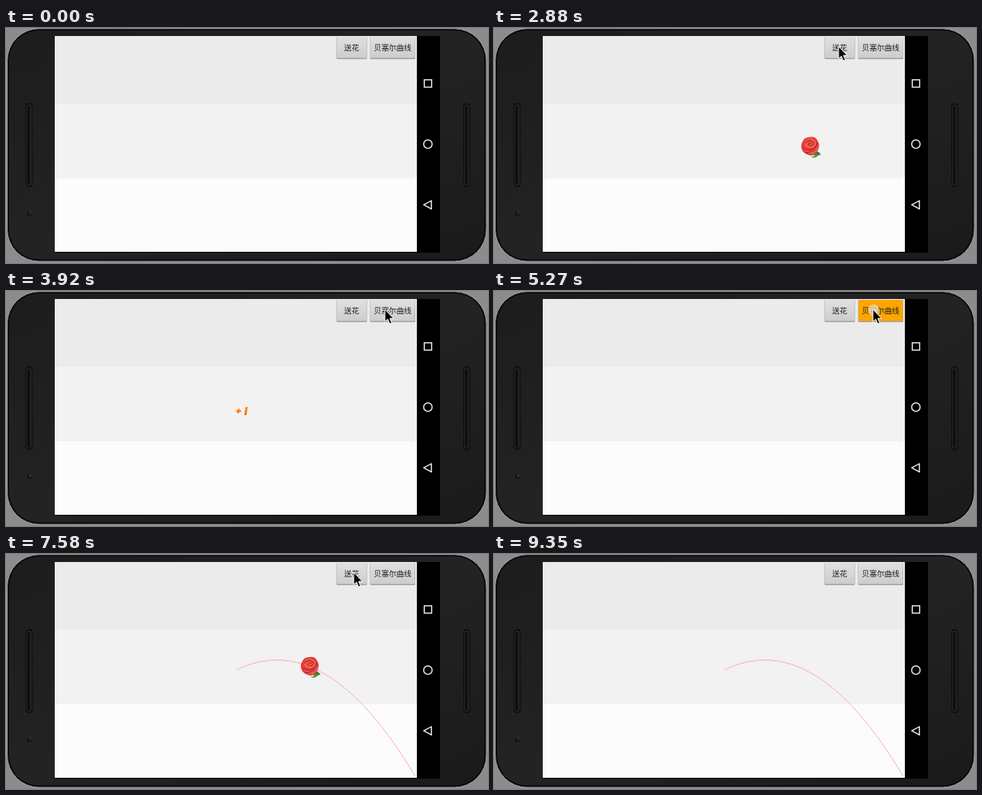
An HTML page that plays this animation: 603x294 px, repeating every 9.89 s.

```html
<!DOCTYPE html>
<html lang="zh-CN">
<head>
<meta charset="utf-8">
<title>送花</title>
<style>
  html, body { margin: 0; width: 100%; height: 100%; overflow: hidden; background: #8c8c8c; }
  svg { display: block; width: 603px; height: 294px; }
  text { font: 9.4px "Noto Sans CJK SC", "Noto Sans CJK", sans-serif; fill: #1c1c1c; text-anchor: middle; }
  .nav { fill: none; stroke: #f0f0f0; stroke-width: 1.4; }
</style>
</head>
<body>
<svg viewBox="0 0 603 294">
  <defs>
    <linearGradient id="body" x1="0" y1="0" x2="1" y2="1">
      <stop offset="0" stop-color="#1c1c1c"/>
      <stop offset=".5" stop-color="#232323"/>
      <stop offset="1" stop-color="#1a1a1a"/>
    </linearGradient>
    <linearGradient id="face" x1="0" y1="0" x2="0" y2="1">
      <stop offset="0" stop-color="#e0e0e0"/>
      <stop offset="1" stop-color="#cdcdcd"/>
    </linearGradient>
    <linearGradient id="gold" x1="0" y1="0" x2="0" y2="1">
      <stop offset="0" stop-color="#ff9a10"/>
      <stop offset="1" stop-color="#f4600a"/>
    </linearGradient>
    <radialGradient id="spot">
      <stop offset="0" stop-color="#fff" stop-opacity=".7"/>
      <stop offset=".75" stop-color="#eee" stop-opacity=".6"/>
      <stop offset="1" stop-color="#ddd" stop-opacity="0"/>
    </radialGradient>
    <clipPath id="view"><path d="M61 10H514.5V280H61Z"/></clipPath>
    <g id="speaker">
      <rect x="-4.5" y="94" width="9" height="105" rx="4.5" fill="#0b0b0b"/>
      <rect x="-3.2" y="96" width="6.4" height="101" rx="3.2" fill="#1b1b1b" stroke="#303030" stroke-width=".7"/>
      <path d="M-1 98V195" stroke="#080808" stroke-width="1.6"/>
    </g>
  </defs>

  <!-- phone -->
  <rect x="1.5" y=".7" width="599.5" height="291.3" rx="40" fill="#080808" stroke="#a2a2a2" stroke-width="1"/>
  <rect x="4" y="3" width="594.5" height="286.5" rx="37" fill="url(#body)"/>
  <use href="#speaker" x="29"/>
  <use href="#speaker" x="576.5"/>
  <circle cx="29" cy="232.5" r="4" fill="#151515" stroke="#303030" stroke-width=".7"/>
  <circle cx="30.5" cy="231" r=".8" fill="#777"/>

  <!-- screen -->
  <path d="M61 10H543V281H61Z"/>
  <path d="M61 10H514V95H61Z" fill="#ebebeb"/>
  <path d="M61 95H514V188H61Z" fill="#f2f2f2"/>
  <path d="M61 188H514V280H61Z" fill="#fcfcfc"/>
  <rect class="nav" x="523.3" y="64.8" width="9.2" height="9.2"/>
  <circle class="nav" cx="527.8" cy="145.3" r="5.3"/>
  <path class="nav" d="M522.6 221.2L532.2 216V226.4Z" stroke-linejoin="round"/>

  <g id="buttons"></g>

  <g clip-path="url(#view)">
    <path id="curve" fill="none" stroke="#ff9c9c" stroke-width=".8"/>
    <g id="rose">
      <path d="M1 8Q-1 13 4 14Q9 13 12 9Q9 7 6 8Z" fill="#5d9440"/>
      <path d="M-3 9Q0 14 5 12L3 9Z" fill="#dfe6c8"/>
      <path d="M4 9Q9 11 13 10Q10 5 6 6Z" fill="#3f7d2c"/>
      <path d="M-10-6Q-8-12-1-12Q7-13 9-7Q12-3 10 3Q8 9 1 11Q-7 10-10 5Q-13-1-10-6Z" fill="#e23a38"/>
      <path d="M-8-5Q-5-11 2-10Q8-8 7-2Q4 3-2 2Q-8 1-8-5Z" fill="#f0604a"/>
      <path d="M-10 0Q-6 6 0 5Q7 4 10-2Q11 5 4 9Q-6 10-10 0Z" fill="#ee5a5c"/>
      <path d="M-7-4Q-3-9 2-7Q6-5 3-2Q-1 0-3-3Q-1-6 2-4M-9 2Q-3 6 3 3Q8 1 8-5M-6 7Q0 8 6 4"
            fill="none" stroke="#b81f2a" stroke-width="1.1"/>
    </g>
    <g id="plus" fill="url(#gold)">
      <path d="M-4.7-3H-2.5L-2.9-1.1H-.7L-1.1 1.1H-3.3L-3.7 3H-5.7L-5.3 1.1H-7.4L-7-1.1H-5.1Z"/>
      <path d="M4.6-5H7.6L5.8 5.2H3.1L4.3-2.6L3.8-2.5Z"/>
    </g>
  </g>

  <circle id="touch" r="8" fill="url(#spot)"/>
  <path id="cursor" d="M0 0V15.4L3.5 12.2L5.9 18L8.6 16.9L6.2 11.3H10.8Z"
        fill="#000" stroke="#fff" stroke-width="1" stroke-linejoin="round"/>
</svg>
<script>
const LOOP = 9890;
const GIFTS = [1830, 6450];       // presses of the first button
const SHOW_CURVE = 5270;          // press of the second button
const HOLD = 110;
const FLY = { from: 130, time: 1800, end: 1985 };
const RISE = { from: 1985, time: 905 };
const START = [512, 278], BEND = [400, 90], END = [288, 145];

// time, x, y of the pointer tip
const POINTER = [
  [480, 411, -20], [990, 431, 23],
  [3100, 431, 23], [3500, 474, 23],
  [5850, 474, 23], [6030, 435, 23],
  [7750, 435, 23], [8380, 445, -20]
];

const $ = id => document.getElementById(id);
const clamp = v => Math.min(1, Math.max(0, v));
const ease = v => (1 - Math.cos(Math.PI * clamp(v))) / 2;
const mix = (a, b, k) => a + (b - a) * k;
const place = (el, x, y) => el.setAttribute('transform', `translate(${x.toFixed(2)} ${y.toFixed(2)})`);
const show = (el, opacity) => el.style.opacity = opacity;
const within = (t, from, time) => t >= from && t < from + time;

function addButton(x, width, label) {
  $('buttons').insertAdjacentHTML('beforeend', `
    <rect x="${x - .5}" y="11" width="${width + 1}" height="28" rx="1.5" fill="#a4a4a4"/>
    <rect x="${x}" y="11" width="${width}" height="26.5" rx="1" fill="url(#face)"/>
    <text x="${x + width / 2}" y="27.7">${label}</text>`);
  return $('buttons').querySelector('rect:nth-last-of-type(1)');
}
const send = addButton(414, 37, '送花');
const draw = addButton(456, 55.5, '贝塞尔曲线');
$('curve').setAttribute('d', `M${START}Q${BEND} ${END}`);

const bezier = k => START.map((p, i) =>
  (1 - k) ** 2 * p + 2 * k * (1 - k) * BEND[i] + k * k * END[i]);

function pointerAt(t) {
  const i = POINTER.findIndex(p => p[0] > t);
  if (i < 1) return null;
  const [t0, x0, y0] = POINTER[i - 1], [t1, x1, y1] = POINTER[i];
  const k = ease((t - t0) / (t1 - t0));
  return [mix(x0, x1, k), mix(y0, y1, k)];
}

const paint = (button, pressed) => button.setAttribute('fill', pressed ? '#ffa500' : 'url(#face)');

function render(t) {
  const press = GIFTS.filter(g => g <= t).pop();
  const age = press === undefined ? -1 : t - press;

  paint(send, within(age, 0, HOLD));
  paint(draw, within(t, SHOW_CURVE, HOLD));
  show($('curve'), t >= SHOW_CURVE + HOLD ? 1 : 0);

  const flying = within(age, FLY.from, FLY.end - FLY.from);
  show($('rose'), flying ? 1 : 0);
  if (flying) place($('rose'), ...bezier(ease((age - FLY.from) / FLY.time)));

  const rising = within(age, RISE.from, RISE.time);
  const k = ease((age - RISE.from) / RISE.time);
  show($('plus'), rising ? 1 - k : 0);
  if (rising) place($('plus'), 295, mix(151, 122, k));

  const tip = pointerAt(t);
  show($('cursor'), tip ? 1 : 0);
  if (tip) place($('cursor'), ...tip);

  const touched = [...GIFTS, SHOW_CURVE].find(g => within(t, g, 2 * HOLD));
  show($('touch'), touched === undefined ? 0 : 1 - clamp((t - touched - HOLD) / HOLD));
  if (tip) place($('touch'), tip[0] + 1, tip[1] + 1);
}

const begin = performance.now();
function tick() {
  render((performance.now() - begin) % LOOP);
  requestAnimationFrame(tick);
}
tick();
</script>
</body>
</html>
```
